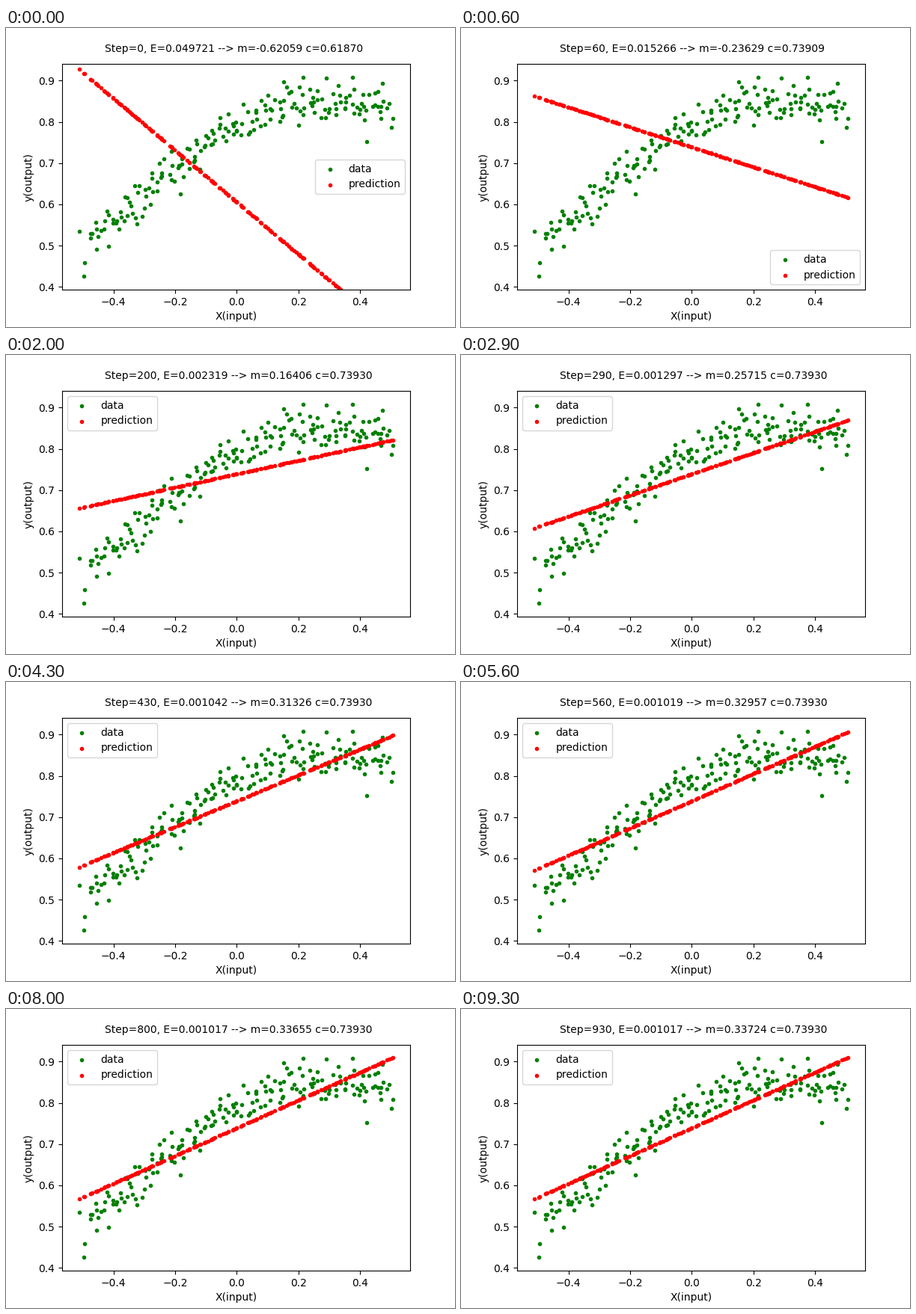
A matplotlib script for the animation above (9400 ms loop, 600x400 px).

```python
import numpy as np
import matplotlib.pyplot as plt
from matplotlib.animation import FuncAnimation

FRAMES, INTERVAL, STRIDE = 94, 100, 10

# Gradient descent: both parameters decay geometrically to the best fit.
M_FIT, M_GAP = 0.337577, 0.958167
C_FIT, C_GAP = 0.739304, 0.120606
E_FIT, RATE, VAR_X = 0.0010167, 0.1, 0.085074


def params(step):
    m = M_FIT - M_GAP * (1 - RATE * VAR_X) ** step
    c = C_FIT - C_GAP * (1 - RATE) ** step
    return m, c


def error(m, c):
    return E_FIT + (VAR_X * (m - M_FIT) ** 2 + (c - C_FIT) ** 2) / 2


def trend(x):
    return 0.785 + 0.4 * x - 0.53 * x ** 2 - 0.3 * x ** 3


def make_data(count=180):
    """Noisy points along the trend, plus the few that stand far out."""
    far = [(-0.512, 0.535), (-0.497, 0.426), (-0.495, 0.459), (-0.324, 0.553),
           (-0.183, 0.625), (0.153, 0.897), (0.216, 0.908), (0.291, 0.906),
           (0.376, 0.908), (0.473, 0.893), (0.422, 0.752), (0.508, 0.808)]
    rng = np.random.default_rng(4)
    x = np.linspace(-0.48, 0.495, count) + rng.uniform(-0.012, 0.012, count)
    noise = np.clip(rng.normal(0, 0.025, count), -0.05, 0.05)
    return np.vstack([far, np.column_stack([x, trend(x) + noise])]).T


x, y = make_data()

plt.rcParams["font.family"] = "DejaVu Sans"
plt.rcParams["font.size"] = 10
fig = plt.figure(figsize=(6, 4), dpi=100)
ax = fig.add_axes([0.125, 0.125, 0.775, 0.755])
ax.scatter(x, y, marker=".", s=36, color="green", label="data")
pred = ax.scatter(x, y, marker=".", s=36, color="red", label="prediction")
ax.set_xlim(-0.5669, 0.5631)
ax.set_ylim(0.3932, 0.9407)
ax.set_xticks(np.arange(-2, 3) * 0.2)
ax.set_yticks(np.arange(4, 10) * 0.1)
ax.set_xlabel("X(input)")
ax.set_ylabel("y(output)")
ax.legend(loc="best")
title = fig.text(0.22, 0.92, "")


def update(i):
    step = i * STRIDE
    # The line and the error belong to the parameters before the update.
    m_old, c_old = params(step - 1)
    m, c = params(step)
    pred.set_offsets(np.column_stack([x, m_old * x + c_old]))
    title.set_text(f"Step={step}, E={error(m_old, c_old):.6f} --> "
                   f"m={m:.5f} c={c:.5f}")
    return pred, title


anim = FuncAnimation(fig, update, frames=FRAMES, interval=INTERVAL,
                     init_func=lambda: update(0), repeat=True, repeat_delay=0)
plt.show()
```
